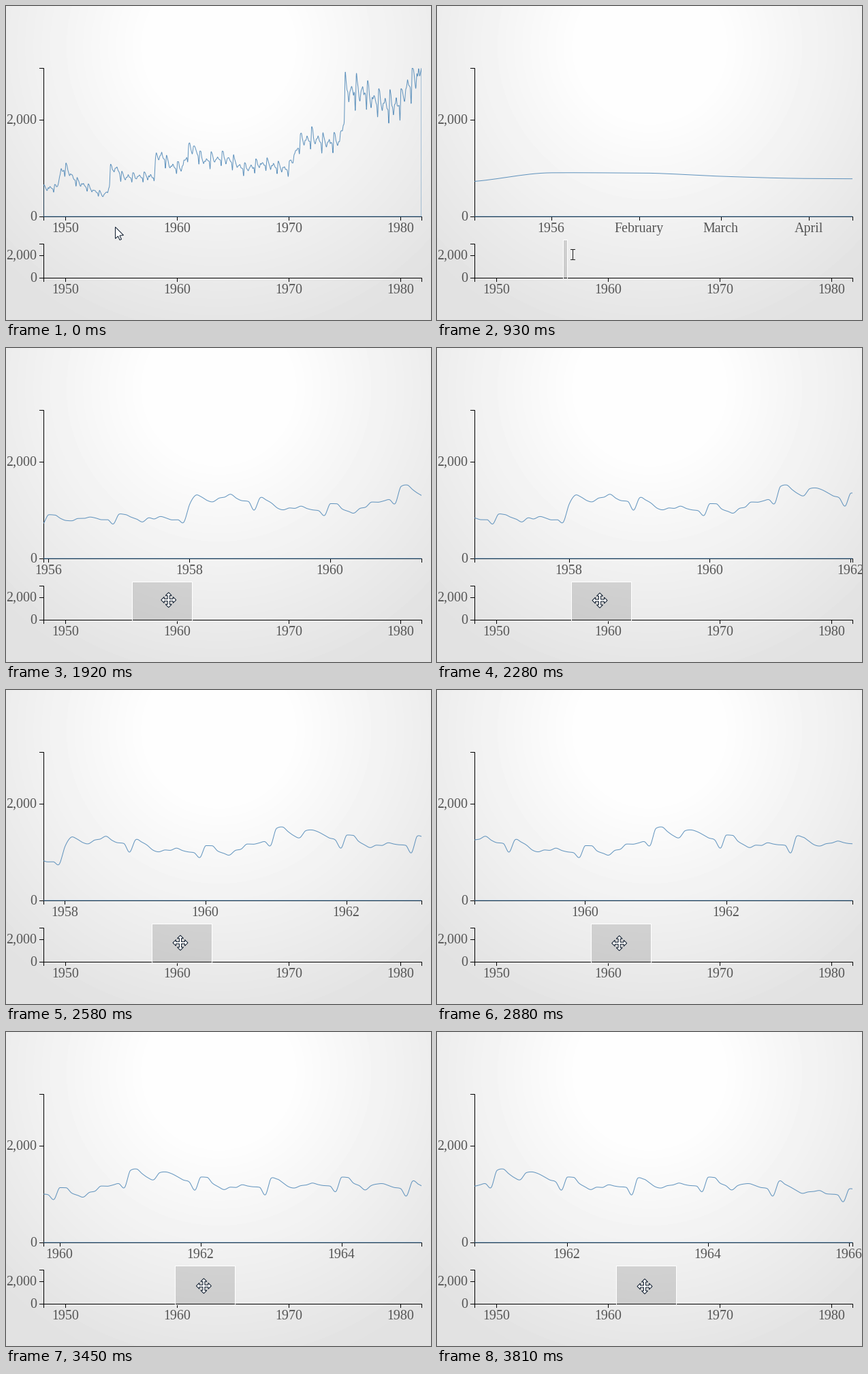
Write a matplotlib script that moves like this. It is 624 by 461 pixels and loops after 4560 ms.

```python
import numpy as np
import matplotlib.pyplot as plt
from matplotlib.animation import FuncAnimation
from matplotlib.patches import Polygon, Rectangle

W, H = 624, 461
STEP, FRAMES = 30, 152
PX = 0.72                      # one pixel in points at 100 dpi
LEFT, RIGHT = 55, 610
TOP, BASE = 91, 309
TOP2, BASE2 = 349, 399
MAX_PRICE = 3081
COUNT = 407                    # months of data
START = np.datetime64("1948-01-01")
MONTHS = ("January February March April May June July August "
          "September October November December").split()

# ---------------------------------------------------------------- data
# long-term level as (year, price); the rest is season and chance
TREND = [(48, 580), (49.2, 600), (49.6, 950), (50, 1000), (51, 720),
         (52, 600), (53.3, 440), (53.8, 520), (54, 950), (54.6, 1000),
         (55, 820), (57.9, 830), (58.1, 1220), (58.6, 1290), (59, 1130),
         (59.5, 1030), (60.4, 1010), (61.1, 1400), (61.5, 1430),
         (62, 1220), (62.5, 1150), (64, 1230), (65, 1130), (66, 980),
         (67.7, 1100), (69.9, 980), (71, 1550), (72, 1640), (73, 1530),
         (74.5, 1560), (74.85, 1950), (75, 2600), (76.5, 2600),
         (78, 2380), (79.2, 2280), (80.1, 2400), (80.6, 2700), (81.8, 3000)]
# relative change per month, January first
SEASON = [.12, .10, .03, -.03, -.07, 0, .01, .04, 0, -.02, -.03, -.14]


def month_days():
    months = START.astype("M8[M]") + np.arange(COUNT)
    return (months.astype("M8[D]") - START).astype(float)


def prices():
    month = np.arange(COUNT)
    level = np.interp(48 + month / 12, *zip(*TREND))
    chance = np.random.default_rng(7).uniform(-.02, .02, COUNT)
    price = level * (1 + np.array(SEASON)[month % 12] + chance)
    price[-1] = MAX_PRICE
    return np.minimum(price, MAX_PRICE)


def monotone(x, y, n=16):
    """Monotone cubic through the points, n samples per span."""
    h = np.diff(x)
    d = np.diff(y) / h
    m = np.concatenate([d[:1], (d[:-1] + d[1:]) / 2, d[-1:]])
    for i, slope in enumerate(d):
        if abs(slope) < 1e-9:
            m[i] = m[i + 1] = 0
            continue
        size = np.hypot(m[i], m[i + 1]) / abs(slope)
        if size > 3:
            m[i] *= 3 / size
            m[i + 1] *= 3 / size
    t = np.arange(n) / n
    h, y0, y1 = h[:, None], y[:-1, None], y[1:, None]
    m0, m1 = m[:-1, None] * h, m[1:, None] * h
    ys = (y0 * (1 + 2 * t) * (1 - t) ** 2 + m0 * t * (1 - t) ** 2
          + y1 * t * t * (3 - 2 * t) + m1 * t * t * (t - 1))
    xs = x[:-1, None] + t * h
    return np.append(xs, x[-1]), np.append(ys, y[-1])


DAYS = month_days()
TOTAL = DAYS[-1]
curve_x, curve_p = monotone(DAYS, prices())
curve_y = BASE - (BASE - TOP) * curve_p / MAX_PRICE
AREA_X = np.concatenate([curve_x, [TOTAL, 0, 0]])
AREA_Y = np.concatenate([curve_y, [BASE, BASE, curve_y[0]]])


def time_ticks(a, b):
    """Day offsets and labels of about four ticks between days a and b."""
    span = b - a
    target = span / 4
    offs = np.arange(np.ceil(a), np.floor(b) + 1).astype(int)
    dates = START + offs
    months = dates.astype("M8[M]")
    num = months.astype(int)
    mon, year = num % 12, num // 12 + 1970
    first = dates == months.astype("M8[D]")
    if target < np.sqrt(7 * 30):
        keep = (dates.astype(int) - 3) % 7 == 0
    elif target < np.sqrt(30 * 90):
        keep = first
    elif target < np.sqrt(90 * 365):
        keep = first & (mon % 3 == 0)
    else:
        years = span / 365
        step = 10 ** max(0, int(np.floor(np.log10(years / 4))))
        err = 4 / years * step
        step *= 10 if err <= .15 else 5 if err <= .35 else 2 if err <= .75 else 1
        keep = first & (mon == 0) & (year % step == 0)
    labels = []
    for i in np.flatnonzero(keep):
        if not first[i]:
            day = (dates[i] - months[i].astype("M8[D]")).astype(int) + 1
            labels.append(f"{MONTHS[mon[i]][:3]} {day:02d}")
        else:
            labels.append(MONTHS[mon[i]] if mon[i] else str(year[i]))
    return offs[keep], labels


# ---------------------------------------------------------------- motion
def track(*keys):
    times, values = zip(*keys)
    return lambda t: float(np.interp(t, times, values))


brush_left = track((2130, 185), (2280, 197), (2580, 214), (3120, 235),
                   (3810, 263))
brush_width = track((810, 0), (930, 6), (1440, 78), (1500, 87),
                    (1650, 87), (1680, 88))
pointer_x = track((240, 160), (600, 178), (810, 178), (930, 199.5),
                  (1440, 260.5), (1500, 270), (1680, 270), (2010, 227))
pointer_y = track((240, 324), (600, 365), (930, 365), (1440, 369),
                  (3810, 373.5))


def pointer(t):
    # once the brush is held, the pointer travels with it
    return pointer_x(t) + brush_left(t) - brush_left(0), pointer_y(t)


# ---------------------------------------------------------------- stage
plt.rcParams["font.family"] = "Liberation Serif"
fig = plt.figure(figsize=(6.24, 4.61), dpi=100)
ax = fig.add_axes([0, 0, 1, 1])
ax.axis("off")

gy, gx = np.mgrid[0:H, 0:W]
radius = np.hypot(gx - W / 2, gy - 60)
shade = np.clip(255 - 0.082 * np.maximum(0, radius - 90), 226, 254)
ax.imshow(shade, cmap="gray", vmin=0, vmax=255, extent=(0, W, H, 0),
          interpolation="nearest", aspect="auto")
ax.set_xlim(0, W)
ax.set_ylim(H, 0)


def crisp(xs, ys):
    return ax.plot(xs, ys, color="black", lw=PX, snap=True, zorder=2,
                   solid_capstyle="projecting", solid_joinstyle="miter")[0]


def label(x, y, s, ha="center"):
    return ax.text(x, y, s, size=20 * PX, color="#555555", ha=ha,
                   va="baseline", zorder=2)


def frame_axes(top, base):
    crisp([LEFT - 6, LEFT, LEFT, LEFT - 6], [top, top, base, base])
    crisp([LEFT, LEFT, RIGHT, RIGHT], [base + 5, base, base, base + 5])
    for price in (0, 2000):
        y = int(base - (base - top) * price / MAX_PRICE)
        crisp([LEFT - 6, LEFT], [y, y])
        label(LEFT - 10, y + 6, f"{price:,}", "right")


class TickRow:
    def __init__(self, base, size):
        self.marks = [crisp([0, 0], [base, base + 5]) for _ in range(size)]
        self.texts = [label(0, base + 23, "") for _ in range(size)]

    def show(self, a, b):
        offs, labels = time_ticks(a, b)
        xs = LEFT + (RIGHT - LEFT) * (offs - a) / (b - a)
        for i, (mark, text) in enumerate(zip(self.marks, self.texts)):
            on = i < len(xs)
            mark.set_visible(on)
            text.set_visible(on)
            if on:
                mark.set_xdata([int(xs[i])] * 2)
                text.set_x(xs[i] - 1)
                text.set_text(labels[i])


frame_axes(TOP, BASE)
frame_axes(TOP2, BASE2)
main_ticks = TickRow(BASE, 10)
TickRow(BASE2, 4).show(0, TOTAL)

line, = ax.plot([], [], color="steelblue", alpha=0.85, lw=PX, snap=False,
                zorder=3)
line.set_clip_path(Rectangle((LEFT, TOP), RIGHT - LEFT, BASE + 1 - TOP,
                             transform=ax.transData))

brush = Rectangle((185, 343), 1, 57, fc=(0, 0, 0, 0.125), ec="white",
                  lw=PX, snap=True, zorder=4)
ax.add_patch(brush)

# ---------------------------------------------------------------- cursors
ARROW = np.array([(0, 0), (0, 17), (4, 13.5), (6.5, 19), (9, 18),
                  (6.5, 12.5), (12, 12)]) + 0.5
corner = np.array([(.5, 7), (3.5, 7), (3.5, 8)])
BEAM = np.vstack([corner, corner[::-1] * (-1, 1),
                  corner * (-1, -1), corner[::-1] * (1, -1)])
arm = np.array([(-1.5, -1.5), (-1.5, -6.5), (-4.5, -6.5), (0, -11),
                (4.5, -6.5), (1.5, -6.5)])
turn = np.array([(0, 1), (-1, 0)])
MOVE = np.vstack([arm @ np.linalg.matrix_power(turn, k) for k in range(4)])

cursor = Polygon(ARROW, closed=True, fc="white", ec="#0c1a2c", lw=PX,
                 joinstyle="miter", zorder=6)
ax.add_patch(cursor)


def show_cursor(t):
    shape, fill, edge = ARROW, "white", "#0c1a2c"
    if t >= 1770:
        shape = MOVE
    elif t >= 420:
        shape, fill, edge = BEAM, "#202020", "none"
    cursor.set_xy(shape + pointer(t))
    cursor.set_facecolor(fill)
    cursor.set_edgecolor(edge)


def draw(i):
    t = i * STEP
    x0, width = round(brush_left(t)), round(brush_width(t))
    a, b = 0, TOTAL
    brush.set_visible(width > 0)
    if width:
        brush.set_x(x0)
        brush.set_width(width)
        scale = TOTAL / (RIGHT - LEFT)
        a, b = (x0 - LEFT) * scale, (x0 + width - LEFT) * scale
    line.set_data(LEFT + (RIGHT - LEFT) * (AREA_X - a) / (b - a), AREA_Y)
    main_ticks.show(a, b)
    show_cursor(t)
    return []


anim = FuncAnimation(fig, draw, frames=FRAMES, interval=STEP, repeat=True,
                     repeat_delay=0, init_func=lambda: draw(0))
plt.show()
```
